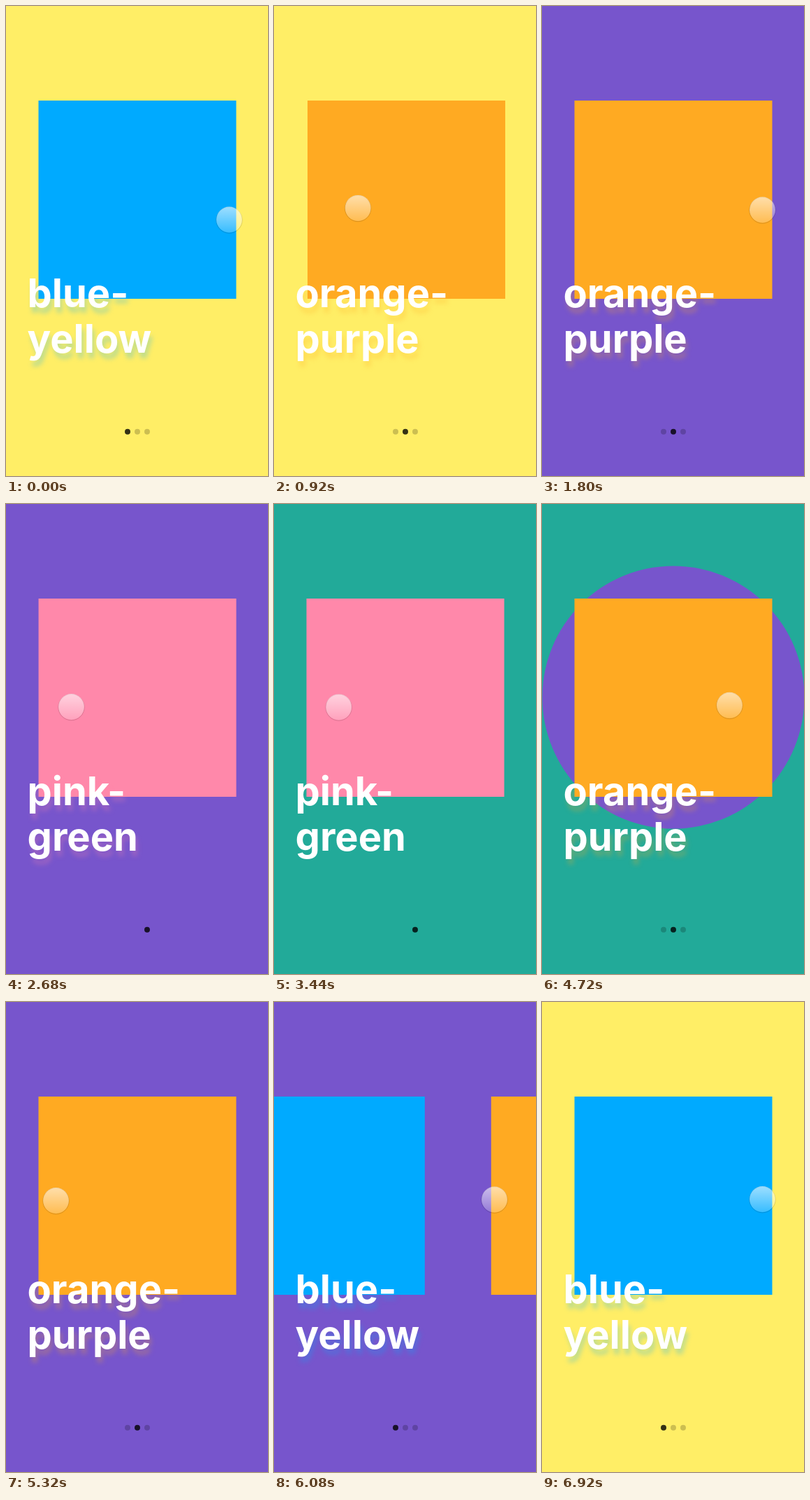
An HTML page for the animation above (7 s loop, 375 by 671 pixels).

```html
<!DOCTYPE html>
<html lang="en">
<head>
<meta charset="utf-8">
<title>Colour pager</title>
<style>
  html, body { margin: 0; width: 100%; height: 100%; overflow: hidden; }
  svg { display: block; width: 100%; height: 100%; }
  text { font: 700 56px Inter, "Liberation Sans", sans-serif; fill: #fff; }
</style>
</head>
<body>
<svg viewBox="0 0 375 671">
  <defs>
    <linearGradient id="glass" x2="0" y2="1">
      <stop stop-color="#fff" stop-opacity=".62"/>
      <stop offset="1" stop-color="#fff" stop-opacity=".22"/>
    </linearGradient>
  </defs>
  <rect id="base" width="375" height="671"/>
  <circle id="reveal" cx="188" cy="276"/>
  <g id="track"></g>
  <g id="title">
    <text x="30.5" y="429.5"></text>
    <text x="30.5" y="494.5"></text>
  </g>
  <g id="dots"></g>
  <g id="finger">
    <circle r="18.6" cy=".7" fill="none" stroke="#000" stroke-opacity=".15"/>
    <circle r="18.5" fill="url(#glass)"/>
  </g>
</svg>
<script>
const LOOP = 7000, PITCH = 378, REVEAL_MS = 300, REVEAL_SPEED = 1.55;

const slides = [
  { words: ["blue-", "yellow"], card: "#00aaff", back: "#ffee66" },
  { words: ["orange-", "purple"], card: "#ffaa22", back: "#7755cc" },
  { words: ["pink-", "green"], card: "#ff88aa", back: "#22aa99" },
];

const swipes = [
  { from: 0, to: 1, press: 80, release: 560, settle: 960, reveal: 960 },
  { from: 1, to: 2, press: 1800, release: 2280, settle: 2690, reveal: 2700 },
  { from: 2, to: 1, press: 3720, release: 4200, settle: 4600, reveal: 4600 },
  { from: 1, to: 0, press: 5480, release: 6040, settle: 6560, reveal: 6600 },
];

// time, x, y
const fingerPath = [
  [0, 319.5, 305], [80, 319.5, 304], [560, 97, 290], [780, 97, 288],
  [1480, 317, 292], [1800, 315.5, 291], [2280, 93.5, 290], [2680, 93.5, 289.5],
  [3720, 92.5, 290], [4200, 366, 290], [4420, 366, 289], [5200, 72, 284],
  [5320, 71.5, 283.5], [5480, 71.5, 283], [6040, 315.5, 282], [6900, 315.5, 281.5],
];

const $ = id => document.getElementById(id);
const lerp = (a, b, p) => a + (b - a) * p;
const smooth = p => p * p * (3 - 2 * p);

function add(parent, tag, attrs) {
  const node = document.createElementNS("http://www.w3.org/2000/svg", tag);
  for (const key in attrs) node.setAttribute(key, attrs[key]);
  return parent.appendChild(node);
}

slides.forEach((slide, i) =>
  add($("track"), "rect", { x: 46.5 + i * PITCH, y: 135, width: 283, height: 283, fill: slide.card }));
const dots = slides.map((_, i) => add($("dots"), "circle", { cx: 174 + 14 * i, cy: 607.8, r: 4 }));
const lines = [...$("title").children];

function fingerAt(t) {
  const next = fingerPath.findIndex(key => key[0] > t);
  if (next < 0) return fingerPath.at(-1).slice(1);
  const a = fingerPath[next - 1], b = fingerPath[next];
  const p = smooth((t - a[0]) / (b[0] - a[0]));
  return [lerp(a[1], b[1], p), lerp(a[2], b[2], p)];
}

function scrollAt(t) {
  const swipe = swipes.findLast(s => s.press <= t);
  if (!swipe) return 0;
  const { from, to, press, release, settle } = swipe;
  const dragged = fingerAt(press)[0] - fingerAt(Math.min(t, release))[0];
  const start = from * PITCH + dragged;
  if (t <= release) return start;
  const left = 1 - Math.min(1, (t - release) / (settle - release));
  return lerp(to * PITCH, start, left * left);
}

function draw(t) {
  const scroll = scrollAt(t);
  const active = Math.round(scroll / PITCH);
  $("track").setAttribute("transform", `translate(${-scroll} 0)`);

  const change = swipes.findLast(s => s.reveal <= t);
  const back = change ? change.to : 0;
  const age = change ? t - change.reveal : REVEAL_MS;
  const growing = age < REVEAL_MS;
  $("base").setAttribute("fill", slides[growing ? change.from : back].back);
  $("reveal").setAttribute("fill", slides[back].back);
  $("reveal").setAttribute("r", growing ? age * REVEAL_SPEED : 0);

  const { words, card } = slides[active];
  lines.forEach((line, i) => { line.textContent = words[i]; });
  $("title").style.filter = back === 2 ? "none" : `drop-shadow(3px 8px 3px ${card}40)`;

  const rest = active === 2 || back === 2 ? 0 : .2;
  dots.forEach((dot, i) => dot.setAttribute("fill-opacity", i === active ? .8 : rest));

  $("finger").setAttribute("transform", `translate(${fingerAt(t).join(" ")})`);
}

const origin = performance.now();
function frame() {
  draw((performance.now() - origin) % LOOP);
  requestAnimationFrame(frame);
}
frame();
</script>
</body>
</html>
```
